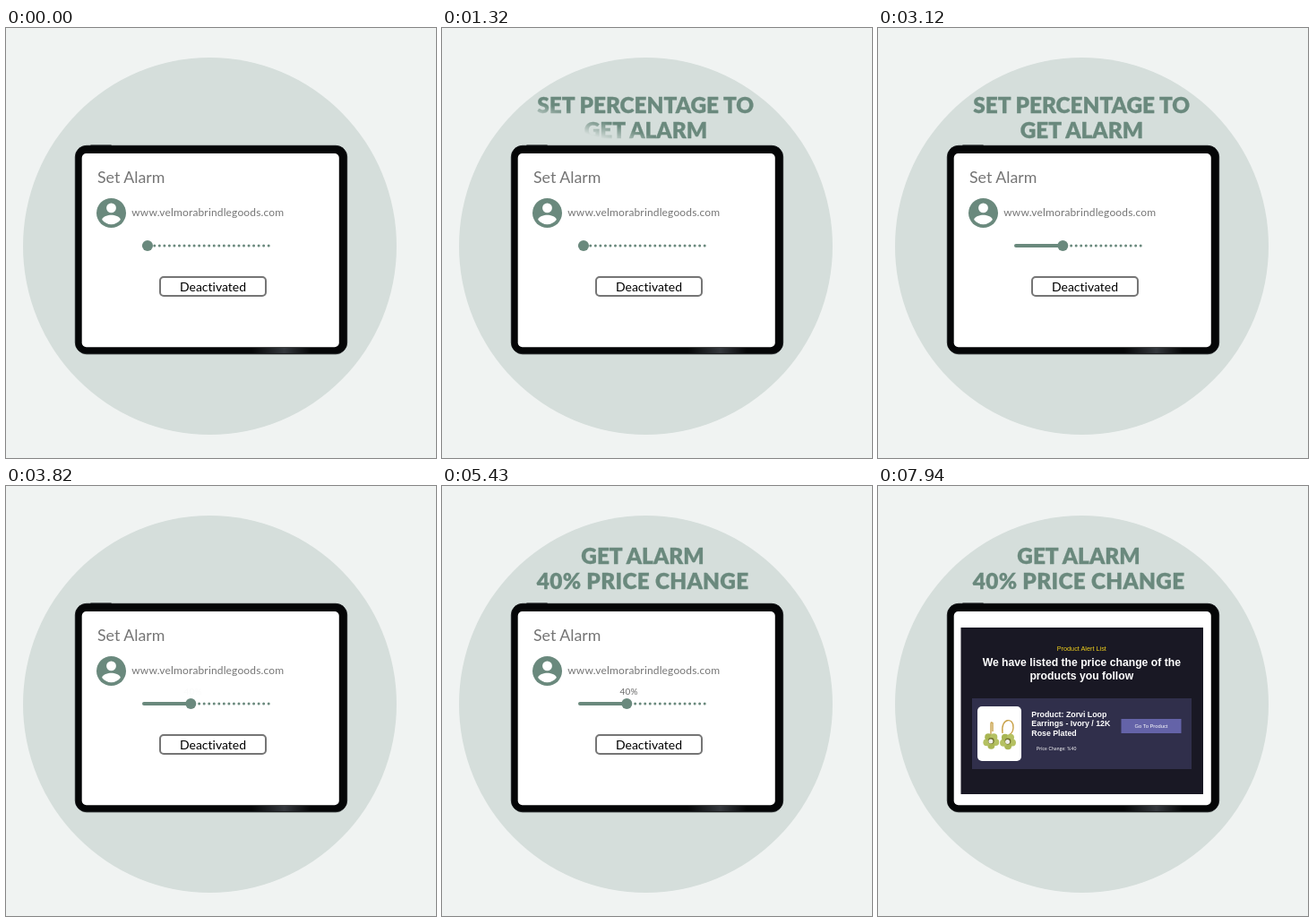
Write an HTML page that moves like this. It is 480 px wide and 480 px high and loops after 8000 ms.

```html
<!DOCTYPE html>
<html lang="en">
<head>
<meta charset="utf-8">
<title>Price alarm</title>
<style>
  html, body { margin: 0; width: 100%; height: 100%; overflow: hidden; background: #f0f3f2; }
  svg { display: block; width: 100%; height: 100%; }
  text { font-family: Lato, "Open Sans", sans-serif; font-variant-ligatures: none; }
  .mid { text-anchor: middle; }
  .headline { font-size: 24.4px; font-weight: 900; fill: #6a897d; stroke: #6a897d; stroke-width: .3px; }
  .grey { fill: #757575; }
  #alerts text { font-family: "Liberation Sans", Arial, sans-serif; fill: #fff; }
  #alerts .bold { font-weight: 700; }
  #alerts .note { font-family: Lato, sans-serif; font-size: 5px; letter-spacing: .2px; }
</style>
</head>
<body>
<svg viewBox="0 0 480 480">
  <defs>
    <linearGradient id="edge" gradientUnits="userSpaceOnUse" x1="0" y1="-20" x2="-5.5" y2="-1.65">
      <stop offset="0" stop-color="#fff"/>
      <stop offset="1" stop-color="#fff" stop-opacity="0"/>
    </linearGradient>
    <mask id="wipe" maskUnits="userSpaceOnUse" x="0" y="0" width="480" height="480">
      <rect width="480" height="480" fill="url(#edge)"/>
    </mask>
    <linearGradient id="shine">
      <stop offset="0" stop-color="#34373c" stop-opacity="0"/>
      <stop offset=".55" stop-color="#34373c"/>
      <stop offset="1" stop-color="#34373c" stop-opacity="0"/>
    </linearGradient>
  </defs>

  <rect width="480" height="480" fill="#f0f3f2"/>
  <ellipse cx="227.5" cy="243.5" rx="208.5" ry="210.5" fill="#d5dedb"/>

  <g mask="url(#wipe)">
    <g id="first" class="headline mid">
      <text x="227.2" y="95">SET PERCENTAGE TO</text>
      <text x="227.4" y="123">GET ALARM</text>
    </g>
    <g id="second" class="headline mid">
      <text x="224" y="87.2">GET ALARM</text>
      <text x="224.2" y="115.4" letter-spacing=".3">40% PRICE CHANGE</text>
    </g>
  </g>

  <!-- tablet -->
  <rect x="78.5" y="133" width="301.5" height="231.8" rx="12" fill="#a3aaa8"/>
  <rect x="94" y="130.4" width="24" height="2" rx="1" fill="#17191b"/>
  <rect x="77.3" y="131.3" width="303.4" height="232.4" rx="12.5" fill="#050607" stroke="#15171a" stroke-width=".8"/>
  <rect x="275" y="357" width="65" height="6" fill="url(#shine)"/>
  <rect x="84.7" y="140" width="287.1" height="216.2" rx="5" fill="#fff"/>

  <text class="grey" x="102" y="172.5" font-size="17.8">Set Alarm</text>
  <g transform="translate(117.5 206.5)">
    <circle r="16.5" fill="#6a897d"/>
    <circle cy="-5.6" r="5.4" fill="#fff"/>
    <path d="M0 12.7C-4 12.7-7.8 10.6-10.3 7.4C-10.2 4-3.3 2.2 0 2.2S10.2 4 10.3 7.4C7.8 10.6 4 12.7 0 12.7Z" fill="#fff"/>
  </g>
  <text class="grey" x="140.3" y="210" font-size="12" letter-spacing=".15">www.velmorabrindlegoods.com</text>

  <g stroke="#6a897d" stroke-linecap="round">
    <path d="M293.2 243H158" stroke-width="3" stroke-dasharray="0 5.54"/>
    <line id="track" x1="154" y1="243" y2="243" stroke-width="4"/>
  </g>
  <circle id="knob" cy="243" r="6" fill="#6a897d"/>
  <text id="percent" class="mid" x="208.6" y="233" font-size="10" letter-spacing=".2" fill="#6b6b6b">40%</text>

  <rect x="172" y="278" width="118" height="21" rx="4" fill="#fff" stroke="#757575" stroke-width="2"/>
  <text class="mid" x="231" y="294" font-size="14">Deactivated</text>

  <g id="alerts">
    <rect x="92.5" y="158" width="270.5" height="186" fill="#191824"/>
    <text class="mid" x="227.3" y="184.2" font-size="7.3" style="fill:#f0cf1c">Product Alert List</text>
    <g class="bold mid" font-size="12.2">
      <text x="227.3" y="201.3">We have listed the price change of the</text>
      <text x="227.3" y="216">products you follow</text>
    </g>
    <rect x="105" y="237" width="245" height="79" fill="#302f4b"/>
    <rect x="111" y="246" width="49" height="61" rx="5" fill="#fff"/>
    <g fill="none" stroke="#c9a24a" stroke-width="1.4">
      <path d="M126 278V265.5Q126 263 128 264.5V274"/>
      <path d="M139 276C136.5 258 152 258 151 270Q150.5 276 146 278"/>
    </g>
    <g id="flowers"></g>
    <g class="bold" font-size="8.8">
      <text x="171.3" y="257.6">Product: Zorvi Loop</text>
      <text x="171.3" y="268.3">Earrings - Ivory / 12K</text>
      <text x="171.3" y="279">Rose Plated</text>
    </g>
    <text class="note" x="177" y="294.7">Price Change: %40</text>
    <rect x="271.5" y="260" width="67" height="16" fill="#6463a8"/>
    <text class="mid" x="305" y="270.1" font-size="5.8">Go To Product</text>
  </g>
</svg>
<script>
  const LOOP = 8000;
  const $ = id => document.getElementById(id);
  const progress = (t, from, to) => Math.min(1, Math.max(0, (t - from) / (to - from)));
  const mix = (a, b, p) => a + (b - a) * p;
  const easeInOut = p => p < .5 ? 2 * p * p : 1 - 2 * (1 - p) * (1 - p);

  function flower(cx, cy) {
    let parts = '';
    for (let i = 0; i < 5; i++) {
      const a = i * Math.PI * .4 + .3;
      const x = cx + 5.2 * Math.cos(a), y = cy + 5.2 * Math.sin(a);
      parts += `<circle cx="${x}" cy="${y}" r="4" fill="${i % 2 ? '#a9b653' : '#b5c162'}"/>`;
    }
    return parts + `<circle cx="${cx}" cy="${cy}" r="3.4" fill="#6f702f"/>` +
      `<circle cx="${cx - .4}" cy="${cy + .4}" r="2.5" fill="#f0efe8"/>`;
  }
  $('flowers').innerHTML = flower(126.3, 284.5) + flower(145, 285);

  // The first headline flickers twice before it goes.
  function firstOpacity(t) {
    if (t >= 3680) return 0;
    if (t >= 3260 && t < 3330) return .4;
    if (t >= 3470 && t < 3540) return 0;
    return 1;
  }

  function draw(t) {
    const front = t < 3750
      ? mix(-27, 95, progress(t, 240, 1600))
      : mix(-19, 104, progress(t, 3960, 5430));
    $('edge').setAttribute('gradientTransform', `translate(0 ${front})`);
    $('first').setAttribute('opacity', firstOpacity(t));
    $('second').setAttribute('opacity', t < 3750 ? 0 : 1);

    const x = mix(158, 206.3, easeInOut(progress(t, 2070, 3120)));
    $('knob').setAttribute('cx', x);
    $('track').setAttribute('x2', x);
    $('percent').setAttribute('opacity', progress(t, 3800, 4520));
    $('alerts').setAttribute('opacity', progress(t, 5800, 7940));
  }

  const start = performance.now();
  function tick() {
    draw((performance.now() - start) % LOOP);
    requestAnimationFrame(tick);
  }
  tick();
</script>
</body>
</html>
```
